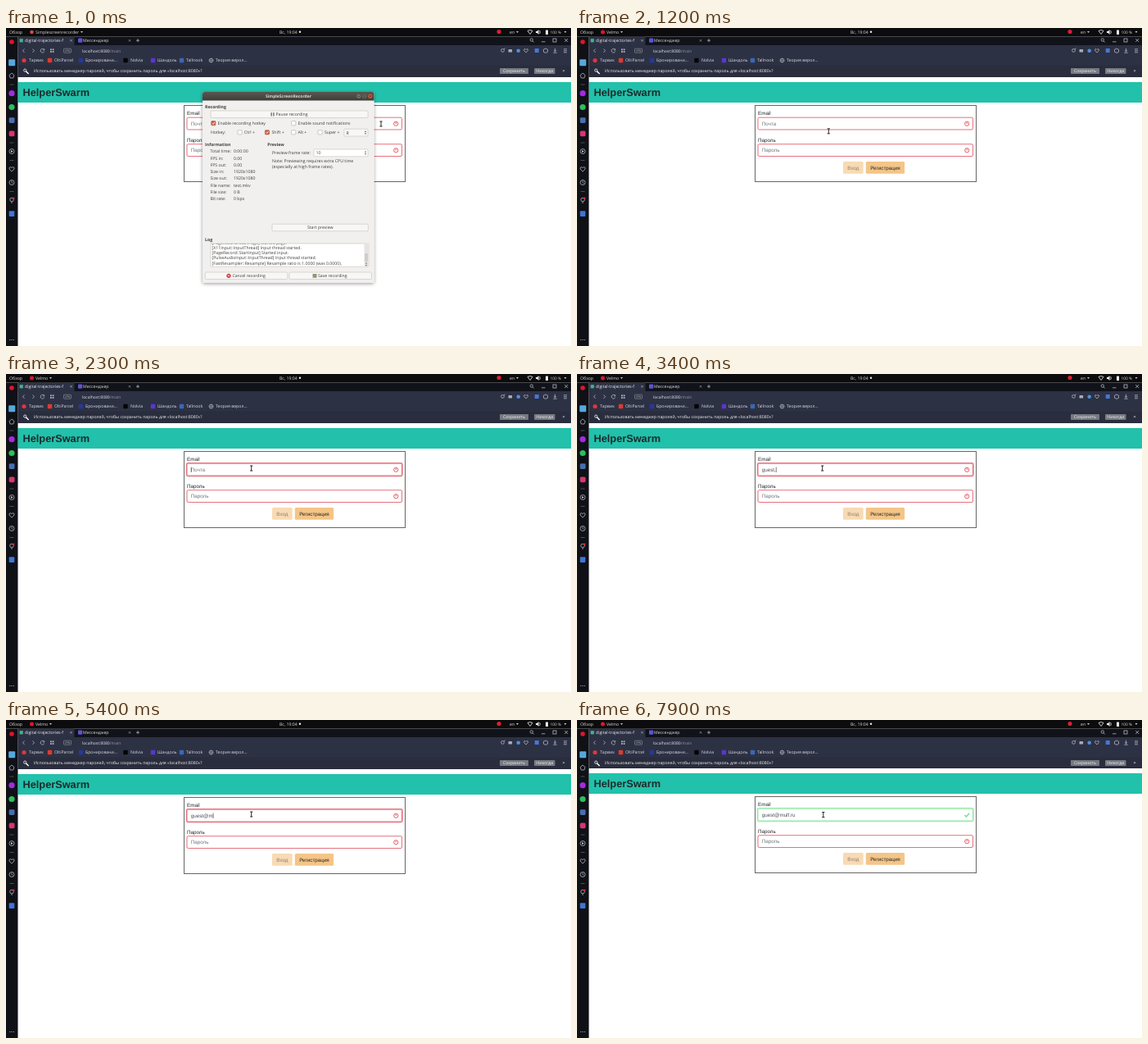
These frames come from a looping animation (690 px wide and 388 px high, 8 s). An HTML page:

```html
<!DOCTYPE html>
<html lang="ru">
<head>
<meta charset="utf-8">
<title>Login form recording</title>
<style>
html, body { margin: 0; width: 100%; height: 100%; overflow: hidden; background: #fff; }
svg { display: block; width: 690px; height: 388px; }
text { font: 5.2px "Open Sans", "Noto Sans", sans-serif; text-rendering: geometricPrecision; white-space: pre; }
.b { font-weight: 700; }
.m { text-anchor: middle; }
.page text { font: 6.25px "Liberation Sans", Arial, sans-serif; }
.page .h1 { font-size: 12.75px; font-weight: 700; }
</style>
</head>
<body>
<svg id="stage" viewBox="0 0 690 388"></svg>
<script>
const GREY = '#b4b6be', RED = '#dc3545', BAR = '#2d3144';

const text = (x, y, s, fill = '#ddd', cls = '', more = '') =>
  `<text x="${x}" y="${y}" fill="${fill}" class="${cls}" ${more}>${s}</text>`;
const box = (x, y, w, h, fill, more = '') =>
  `<rect x="${x}" y="${y}" width="${w}" height="${h}" fill="${fill}" ${more}/>`;
const dot = (x, y, r, fill, more = '') => `<circle cx="${x}" cy="${y}" r="${r}" fill="${fill}" ${more}/>`;
const line = (d, stroke = GREY, w = .8, more = '') =>
  `<path d="${d}" fill="none" stroke="${stroke}" stroke-width="${w}" ${more}/>`;
const ring = (x, y, r, c = GREY) => dot(x, y, r, 'none', `stroke="${c}" stroke-width=".8"`);
const cross = (x, y, r = 1.4, c) => line(`M${x - r} ${y - r}l${2 * r} ${2 * r}m0 ${-2 * r}l${-2 * r} ${2 * r}`, c, .7);
const down = (x, y) => `<path d="M${x} ${y}h3l-1.5 2z" fill="#ccc"/>`;
const group = (id, s) => `<g id="${id}">${s}</g>`;

function topBar() {
  return box(0, 0, 690, 10.5, '#0c0c0e') + text(4, 7, 'Обзор') +
    group('appRecorder', dot(31.5, 5, 2.3, '#d64a4a') + text(36, 7, 'Simplescreenrecorder') + down(91, 4)) +
    group('appBrowser', dot(31.5, 5, 2.5, '#e0162b') + text(36, 7, 'Velmo') + down(53, 4)) +
    text(334, 7, 'Вс, 19:04') + dot(359, 4.8, 1.2, '#eee') +
    dot(602, 4.5, 2.6, '#d8222f') + text(615, 7, 'en') + down(623, 4) +
    line('M637 3.5q3 -2 6 0l-3 4z', '#eee') +
    '<path d="M647 4h1.5l2-2v6l-2-2H647z" fill="#eee"/>' + line('M651.6 3q1.5 2 0 4', '#eee') +
    box(659, 2.5, 3, 5.5, '#eee', 'rx=".5"') + text(664.5, 6.8, '100 %', '#ddd', '', 'style="font-size:4.8px"') + down(681.5, 4);
}

function sideBar() {
  let s = box(0, 10.5, 14.5, 378, '#0f1117') + dot(7, 17, 2.8, '#e0162b');
  s += box(3.2, 38.2, 8, 8, '#56a8dd', 'rx="1"');
  s += line('M7 55l3 2.5-1.2 3.5H5.2L4 57.5z');
  s += dot(7, 79.7, 3.6, '#a32be0') + dot(7, 96.5, 3.6, '#2bc05a');
  s += box(3.7, 109.2, 6.8, 6.8, '#4a6fae', 'rx="1.4"') + box(3.7, 125.4, 6.8, 6.8, '#d9356f', 'rx="1.6"');
  for (const y of [69, 140, 161.5, 199.5]) s += line(`M4.5 ${y}h5`, '#777', .6);
  s += ring(7, 150.5, 3) + '<path d="M6 149l2.6 1.5L6 152z" fill="#ccc"/>';
  s += line('M7 175.2l-3-3.2q-.3-2.6 1.7-2.4l1.3 1.1 1.3-1.1q2-.2 1.7 2.4z');
  s += ring(7, 188.5, 3) + line('M7 186.5v2l1.3 1');
  s += ring(7, 209.5, 2.3) + line('M6 213h2') + dot(9.3, 207.8, 1.2, '#e0283a');
  s += box(3.7, 223.3, 6.6, 6.6, '#3f74d6', 'rx=".8"');
  for (const x of [4.7, 7, 9.3]) s += dot(x, 380.5, .6, '#ccc');
  return s;
}

function browser() {
  let s = box(14.5, 10.5, 676, 11, '#11131a') + box(14.5, 21, 676, 25, BAR) +
    box(15, 10.5, 68.5, 11, BAR, 'rx="1"');
  s += box(16.6, 13.2, 4.2, 4.2, '#3fb58a') + text(23, 17.2, 'digital-trajectories-f', '#eee') +
    box(74.5, 11, 8, 9.5, BAR) + cross(79.5, 15.3, 1.2);
  s += box(88, 12.6, 5.2, 5.2, '#5a54d8', 'rx="1"') + text(94, 17.2, 'Мессенджер') + cross(151, 15.3, 1.2, '#999');
  s += line('M159 15.2h4m-2-2v4');
  s += ring(641.8, 14.5, 1.7) + line('M643 15.8l1.7 1.7M654 16.8h4.5M682.2 13l4 4m0-4l-4 4') +
    box(668, 13, 4, 4, 'none', `stroke="${GREY}" stroke-width=".8"`);

  s += line('M22.5 25.5l-2 2.2 2 2.2M32.5 25.5l2 2.2-2 2.2M46.5 26.3a2.4 2.4 0 1 0 .3 2.2m-.1-3.2v1.7h-1.8');
  for (const x of [54, 56.7]) for (const y of [25.4, 28.1]) s += box(x, y, 1.8, 1.8, GREY);
  s += box(70.5, 25.2, 9, 5, 'none', 'stroke="#999" stroke-width=".6" rx=".8"') +
    text(75, 29.2, 'VPN', '#bbb', 'm', 'style="font-size:3.4px"');
  s += text(93, 29.6, 'localhost:8080<tspan fill="#9498a6">/main</tspan>', '#e6e6ea', '', 'style="font-size:5px"');
  s += ring(606.5, 27.4, 1.9) + line('M608 26l1.5-1.5') + box(613.5, 26, 4.6, 3.6, '#a9abb4', 'rx=".7"') +
    dot(625.7, 27.7, 2.3, '#4f8fe0') + line('M635 30l-2.4-2.5q-.2-2.2 1.4-2l1 1 1-1q1.6-.2 1.4 2z') +
    box(645.7, 25, 5, 5, '#4676d8') +
    line('M659 25l2.5 1.2v3l-2.5 1.2-2.5-1.2v-3zM670.5 24.7v4m-1.7-1.5l1.7 1.6 1.7-1.6M668.3 30.2h4.4M681 25.8h4m-4 2h4m-4 2h4');

  const marks = [
    [22, '#e4343b', 'Тарвик', 28], [53.5, '#df3a2c', 'OltiParcel', 59],
    [91.5, '#26399a', 'Бронировани...', 97], [146, '#050507', 'Nolvia', 152],
    [179.5, '#5a36d2', 'Шандоль', 185], [214.5, '#3b67b8', 'Tallnook', 220]
  ];
  marks.forEach(([x, c, name, tx], i) => {
    s += (i ? box(x - 2.7, 36.8, 5.4, 5.4, c, 'rx="1"') : dot(x, 39.5, 2.6, c)) + text(tx, 41.4, name);
  });
  s += ring(250.5, 39.5, 2.4) + line('M248 39.5h5M250.5 37v5', GREY, .5) + text(256, 41.4, 'Теория верол...');

  s += box(14.5, 45.5, 676, 14.5, '#2a2d3d') +
    ring(23.2, 51.6, 1.6, '#fff') + line('M24.4 52.8l3.2 3.2', '#fff', 1.4) +
    text(34, 54.4, 'Использовать менеджер паролей, чтобы сохранить пароль для «localhost:8080»?', '#eee') +
    box(603, 49, 35, 7, '#777982', 'rx=".7"') + text(620.5, 54.4, 'Сохранить', '#f2f2f2', 'm') +
    box(645, 49, 25.5, 7, '#777982', 'rx=".7"') + text(657.7, 54.4, 'Никогда', '#f2f2f2', 'm') +
    cross(681, 52.2, 1, '#ccc');
  return s;
}

const alarm = y => ring(476.2, y, 2.6, RED) + line(`M476.2 ${y - 1.6}v1.8`, RED, .9);
const field = (y, id) => box(221, y, 262.5, 14.8, '#fff', `id="${id}" rx="1.5" stroke="${RED}" stroke-width=".7"`);

function page() {
  return box(14.5, 60, 676, 340, '#fff') + box(14.5, 66, 676, 25, '#22c1ab') +
    text(20.5, 82.6, 'HelperSwarm', '#1d2a2c', 'h1') +
    box(217.5, 94.5, 270, 93, '#fff', 'stroke="#666" stroke-width="1"') +
    text(221, 106.4, 'Email', '#212529') +
    box(220.4, 108.6, 263.7, 16, 'none', 'id="glow" rx="2" stroke-width="1.6"') + field(109.2, 'mail') +
    `<text id="typed" x="225.8" y="118.8"></text>` + line('', '#222', .6, 'id="caret"') +
    group('bad', alarm(116.8)) +
    group('good', line('M473.3 117l2 2 3.9-4.2', '#6fdc8c', 1.4)) +
    text(221, 139.2, 'Пароль', '#212529') + field(141.7, 'pass') + text(225.8, 151.4, 'Пароль', '#6c757d') + alarm(149.2) +
    box(325, 163, 24.7, 14.7, '#f8dab4', 'rx="1.5"') + text(337.4, 172.6, 'Вход', '#8d806e', 'm') +
    box(352.8, 163, 47.3, 14.7, '#f4c587', 'rx="1.5"') + text(376.5, 172.6, 'Регистрация', '#212529', 'm');
}

function dialog() {
  const ink = '#3c3c3c';
  const label = (x, y, s, cls = '') => text(x, y, s, ink, cls);
  const button = (x, y, w, h = 8.6) => box(x, y, w, h, '#f8f7f6', 'rx="1.2" stroke="#c4c0bb" stroke-width=".6"');
  const input = (x, y, w, h) => box(x, y, w, h, '#fff', 'rx="1" stroke="#c4c0bb" stroke-width=".6"');
  const check = (x, y, on) =>
    box(x - 2.6, y - 2.6, 5.2, 5.2, on ? '#cc6048' : '#fff', `rx=".8" stroke="${on ? '#b0533d' : '#aaa6a1'}" stroke-width=".6"`) +
    (on ? line(`M${x - 1.4} ${y}l1.1 1.2 1.9-2.4`, '#fff', .9) : '');
  const spin = (x, y) => `<path d="M${x} ${y - .7}h2.4l-1.2-1.6zM${x} ${y + .7}h2.4l-1.2 1.6z" fill="#666"/>`;

  let s = box(240, 78, 209.5, 233, '#f1f0ee', 'rx="2" filter="url(#shadow)"') +
    '<path d="M240 88.500V80q0-2 2-2h205.500q2 0 2 2v8.500z" fill="url(#title)"/>' +
    text(345, 85.2, 'SimpleScreenRecorder', '#dfdbd2', 'b m', 'style="font-size:5px"');
  for (const [x, c] of [[430.7, '#77736a'], [437.6, '#77736a'], [444.7, '#d9583a']]) s += dot(x, 83.2, 2.5, c);
  s += line('M429.5 83.4h2.4', '#333', .7) + box(436.5, 82.1, 2.2, 2.2, 'none', 'stroke="#333" stroke-width=".6"') + cross(444.7, 83.2, 1, '#47160a');
  s += label(243, 97.7, 'Recording', 'b') + button(250, 101, 192) + box(323.3, 103.2, 1.7, 4.3, '#888') + box(326, 103.2, 1.7, 4.3, '#888') +
    label(329.5, 107.3, 'Pause recording');
  s += check(253.3, 116.2, 1) + label(258.6, 118.1, 'Enable recording hotkey') + check(351.2, 116.2) + label(356.5, 118.1, 'Enable sound notifications');
  s += label(250, 129.3, 'Hotkey:');
  for (const [x, key, on] of [[285.6, 'Ctrl +'], [319, 'Shift +', 1], [351.2, 'Alt +'], [383.6, 'Super +']])
    s += check(x, 127.3, on) + label(x + 5.4, 129.3, key);
  s += button(412.8, 123.2, 29.2, 8.8) + label(415.5, 129.5, 'R') + spin(437.8, 127.6);

  s += label(243, 144, 'Information', 'b') + label(319.3, 144, 'Preview', 'b');
  const rows = ['Total time:', '0:00:00', 'FPS in:', '0.00', 'FPS out:', '0.00', 'Size in:', '1920x1080', 'Size out:', '1920x1080',
    'File name:', 'test.mkv', 'File size:', '0 B', 'Bit rate:', '0 bps'];
  const ids = { 0: 'time', 2: 'fps', 12: 'size' };
  for (let i = 0; i < rows.length; i += 2) {
    const y = 152.3 + i / 2 * 8.25;
    s += label(249.5, y, rows[i]) + text(278, y, rows[i + 1], ink, '', ids[i] ? `id="${ids[i]}"` : '');
  }
  s += label(325, 154.2, 'Preview frame rate:') + input(376, 148, 66, 8.8) + label(378.5, 154.2, '10') + spin(437.8, 152.4);
  s += label(325, 164.3, 'Note: Previewing requires extra CPU time') + label(325, 170.5, '(especially at high frame rates).');
  s += button(325, 239.2, 117.3) + label(383.7, 245.4, 'Start preview', 'm');

  s += label(243, 260, 'Log', 'b') + input(250, 263, 192.8, 28.2) + '<g clip-path="url(#log)">';
  ['[PageRecord::StartPage] Started page.', '[X11Input::InputThread] Input thread started.', '[PageRecord::StartInput] Started input.',
    '[PulseAudioInput::InputThread] Input thread started.', '[FastResampler::Resample] Resample ratio is 1.0000 (was 0.0000).']
    .forEach((row, i) => s += label(251.5, 264.1 + i * 6.1, row));
  s += '</g>' + box(437.5, 263.4, 5, 27.4, '#e6e4e1') + box(438.2, 275, 3.6, 10, '#cfccc8', 'rx="1"') + spin(438.8, 288.2);
  s += button(243.2, 298, 100.6) + dot(272, 302.3, 2.6, '#d03a3a') + cross(272, 302.3, 1.1, '#fff') + label(276.4, 304.2, 'Cancel recording');
  s += button(346, 298, 100.5) + box(374.5, 300, 5, 4.8, '#8a9a74', 'rx=".6"') + label(381, 304.2, 'Save recording');
  return s;
}

document.getElementById('stage').innerHTML =
  `<defs><filter id="shadow" x="-10%" y="-10%" width="120%" height="120%">
  <feDropShadow dx="0" dy="1" stdDeviation="2" flood-opacity=".4"/></filter>
  <linearGradient id="title" x2="0" y2="1"><stop stop-color="#5a5751"/><stop offset="1" stop-color="#403e3a"/></linearGradient>
  <clipPath id="log"><rect x="250" y="263.3" width="187" height="27.6"/></clipPath></defs>` +
  browser() + `<g id="page" class="page">${page()}</g>` + sideBar() + topBar() + group('dialog', dialog()) +
  group('cursor', group('beam', line('M-1.6 -3h3.2M0 -3v6M-1.6 3h3.2', '#111', .9)) +
    group('arrow', '<path d="M0 0v7l1.7-1.5 1.2 2.5 1.1-.5-1.2-2.5H5z" fill="#222" stroke="#fff" stroke-width=".5"/>'));

const el = {};
document.querySelectorAll('[id]').forEach(n => el[n.id] = n);
const show = (n, on) => n.setAttribute('display', on ? 'inline' : 'none');
const clamp = v => Math.max(0, Math.min(1, v));
const mix = (a, b, k) => `rgb(${a.map((v, i) => Math.round(v + (b[i] - v) * k))})`;

const LOOP = 8000, FOCUS = 2000, VALID = 7300;
const address = 'guest@mulf.ru';
const keys = [[FOCUS, ''], [3200, 'gu'], [3300, 'gues'], [3400, 'guest,'], [4300, 'guest'],
  ...[5000, 5400, 5500, 5700, 5800, 6500, 6900, VALID].map((t, i) => [t, address.slice(0, 6 + i)])];
const path = [[0, 458, 117], [200, 458, 117], [1000, 317.2, 137.6], [1300, 302.3, 120],
  [1800, 299.7, 115], [7700, 299.7, 115], [7900, 300.8, 115.6], [LOOP, 300.8, 115.6]];

function pointer(t) {
  const i = path.findIndex(p => p[0] > t), [t0, x0, y0] = path[i - 1], [t1, x1, y1] = path[i];
  const k = (t - t0) / (t1 - t0);
  return [x0 + (x1 - x0) * k, y0 + (y1 - y0) * k];
}

function draw(t) {
  show(el.appRecorder, t < 600);
  show(el.appBrowser, t >= 600);
  show(el.dialog, t < 1200);
  const counted = t >= 1000;
  el.time.textContent = counted ? '0:00:01' : '0:00:00';
  el.fps.textContent = counted ? '26.57' : '0.00';
  el.size.textContent = counted ? '74 kB' : '0 B';

  const key = keys.filter(k => k[0] <= t).pop() || [0, ''];
  el.typed.textContent = key[1] || 'Почта';
  el.typed.setAttribute('fill', key[1] ? '#495057' : '#6c757d');
  const end = 226.2 + (key[1] ? el.typed.getComputedTextLength() : 0);
  el.caret.setAttribute('d', `M${end} 113.6v6.4`);
  show(el.caret, t >= FOCUS && (t - key[0]) % 1000 < 500);

  const color = mix([220, 53, 69], [105, 225, 135], clamp((t - VALID) / 300));
  el.mail.setAttribute('stroke', color);
  el.glow.setAttribute('stroke', color);
  el.glow.setAttribute('stroke-opacity', .45 * clamp((t - FOCUS + 100) / 200));
  show(el.bad, t < VALID);
  show(el.good, t >= VALID);
  // the password bar starts to close
  el.page.setAttribute('transform', `translate(0 ${t >= 7900 ? -1 : 0})`);

  el.cursor.setAttribute('transform', `translate(${pointer(t)})`);
  const overDialog = t >= 300 && t < 1200;
  show(el.arrow, overDialog);
  show(el.beam, !overDialog);
}

const start = performance.now();
function tick() {
  draw(Math.floor((performance.now() - start) % LOOP / 100) * 100);
  requestAnimationFrame(tick);
}
tick();
</script>
</body>
</html>
```
